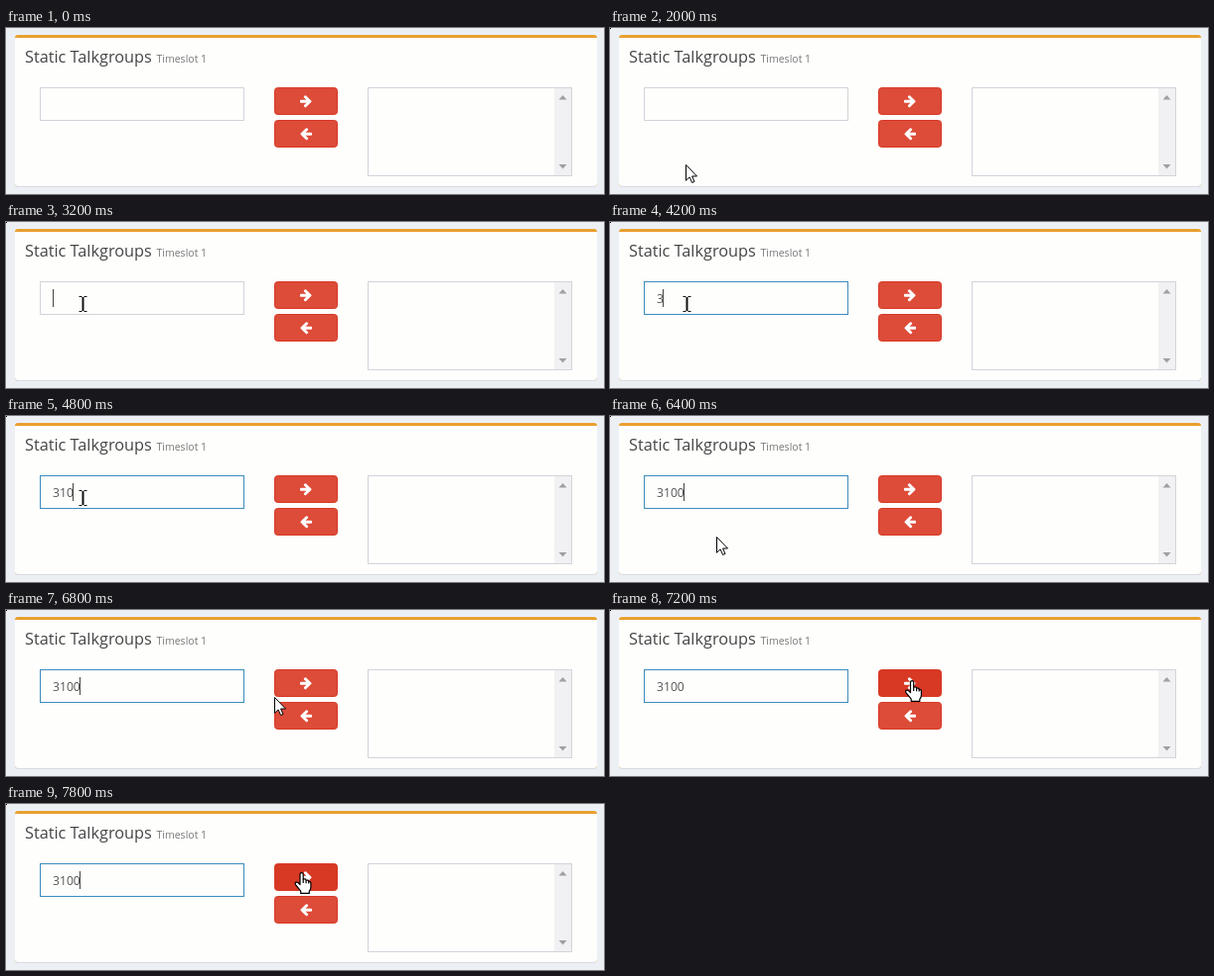
Write an HTML page that moves like this. It is 602x168 px and loops after 8000 ms.

```html
<!DOCTYPE html>
<html lang="en">
<head>
<meta charset="utf-8">
<title>Static Talkgroups</title>
<style>
  html, body { margin: 0; width: 100%; height: 100%; overflow: hidden; background: #ecf0f5; }
  svg { display: block; }
  text { font-family: "Open Sans", "Noto Sans", sans-serif; }
</style>
</head>
<body>
<svg width="602" height="168" viewBox="0 0 602 168">
  <defs>
    <path id="arrowIcon" fill="#fff" transform="scale(.0078125 -.0078125) translate(-768 -576)"
      d="M1472 576q0-54-37-91l-651-651q-39-37-91-37-51 0-90 37l-75 75q-38 38-38 91t38 91l293 293h-704q-52 0-84.5 37.5t-32.5 90.5v128q0 53 32.5 90.5t84.5 37.5h704l-293 294q-38 36-38 90t38 90l75 75q38 38 90 38 53 0 91-38l651-651q37-35 37-90z"/>
  </defs>

  <rect width="602" height="168" fill="#ecf0f5"/>
  <rect x="9" y="8" width="586" height="153" rx="3" fill="#d8dce0"/>
  <rect x="9" y="7" width="586" height="153" rx="3" fill="#e9a02e"/>
  <path d="M9 10H595V157a3 3 0 0 1-3 3H12a3 3 0 0 1-3-3z" fill="#fefefd"/>
  <rect id="corner" width="1" height="1" fill="#000"/>

  <text x="19" y="35" font-size="16.3" fill="#444">Static Talkgroups</text>
  <text x="151.5" y="35" font-size="10.5" fill="#777">Timeslot 1</text>

  <rect id="field" x="34.5" y="60.5" width="205" height="33" fill="#fefefd"/>
  <text id="entry" x="47" y="82" font-size="12.17" fill="#555"></text>
  <rect id="caret" y="68" width="1" height="18" fill="#444"/>

  <g stroke="#d73925">
    <rect id="addButton" x="270.5" y="60.5" width="63" height="27" rx="3"/>
    <rect x="270.5" y="93.5" width="63" height="27" rx="3" fill="#dd4b39"/>
  </g>
  <use href="#arrowIcon" transform="translate(302 74.3)"/>
  <use href="#arrowIcon" transform="translate(302 107.3) scale(-1 1)"/>

  <rect x="364.5" y="60.5" width="205" height="89" fill="#fefefd" stroke="#d2d4d8"/>
  <rect x="552" y="61" width="17" height="88" fill="#f1f1f3"/>
  <path d="M556.5 72.5l4-4.5 4 4.5zM556.5 138l4 4.5 4-4.5z" fill="#a0a0a4"/>

  <g id="pointer" fill="#fff" stroke="#000" stroke-linejoin="round">
    <path d="M.5.5V16.3L4.1 12.9 6.6 18.5 9 17.5 6.6 12H11.5z"/>
  </g>
  <g id="beam" fill="#111">
    <path d="M0 0h3v1h2V0h3v1H5v14h3v1H5v-1H3v1H0v-1h3V1H0z"/>
  </g>
  <g id="hand" fill="#fff" stroke="#000" stroke-width="1.2" stroke-linejoin="round">
    <path d="M5.5 12.5V2.2a1.6 1.6 0 0 1 3.2 0V7.2q2.6-.8 2.9 1 2.3-.6 2.6 1.1 2.2-.2 2.2 2V15q0 2.5-1.6 4.2V21.4H6.2V19.2L1 12.6Q.1 10.6 1.6 10.1 2.8 9.8 4 11z"/>
    <path d="M8.7 7.2V11M11.6 8.2V11.2M14.2 9.3V11.6" fill="none"/>
  </g>
</svg>
<script>
  const LOOP = 8000;
  const el = id => document.getElementById(id);
  const cursors = ["pointer", "beam", "hand"];

  // Each entry: start time, then the value held until the next entry.
  const typing = [[0, ""], [4200, "3"], [4600, "31"], [4800, "310"], [5200, "3100"]];
  const blink = [
    [0, false], [3200, true], [3600, false], [4200, true],
    [5800, false], [6400, true], [7000, false], [7600, true]
  ];
  const mouse = [
    [0, null],
    [2000, ["pointer", 76, 138]],
    [2200, ["pointer", 71, 97]],
    [2400, ["beam", 73.5, 75]],
    [6200, null],
    [6400, ["pointer", 107, 122]],
    [6600, ["pointer", 228, 113]],
    [6800, ["pointer", 270, 88]],
    [7000, ["hand", 294, 74]],
    [7200, ["hand", 297, 71]],
    [7600, ["hand", 322, 69.5]],
    [7800, ["hand", 290.5, 69]]
  ];

  const valueAt = (steps, t) => steps.findLast(([start]) => start <= t)[1];
  const show = (id, on) => el(id).setAttribute("visibility", on ? "visible" : "hidden");

  function draw(t) {
    const text = valueAt(typing, t);
    el("entry").textContent = text;
    el("caret").setAttribute("x", Math.floor(47 + 6.96 * text.length));
    show("caret", valueAt(blink, t));
    show("corner", t >= 400);
    el("field").setAttribute("stroke", t >= 3400 ? "#3c8dbc" : "#d2d4d8");
    el("addButton").setAttribute("fill", t >= 7000 ? "#d73925" : "#dd4b39");

    const [kind, x, y] = valueAt(mouse, t) || [];
    cursors.forEach(id => show(id, id === kind));
    if (kind) el(kind).setAttribute("transform", `translate(${x} ${y})`);
  }

  const begin = performance.now();
  function tick() {
    draw((performance.now() - begin) % LOOP);
    requestAnimationFrame(tick);
  }
  tick();
</script>
</body>
</html>
```
